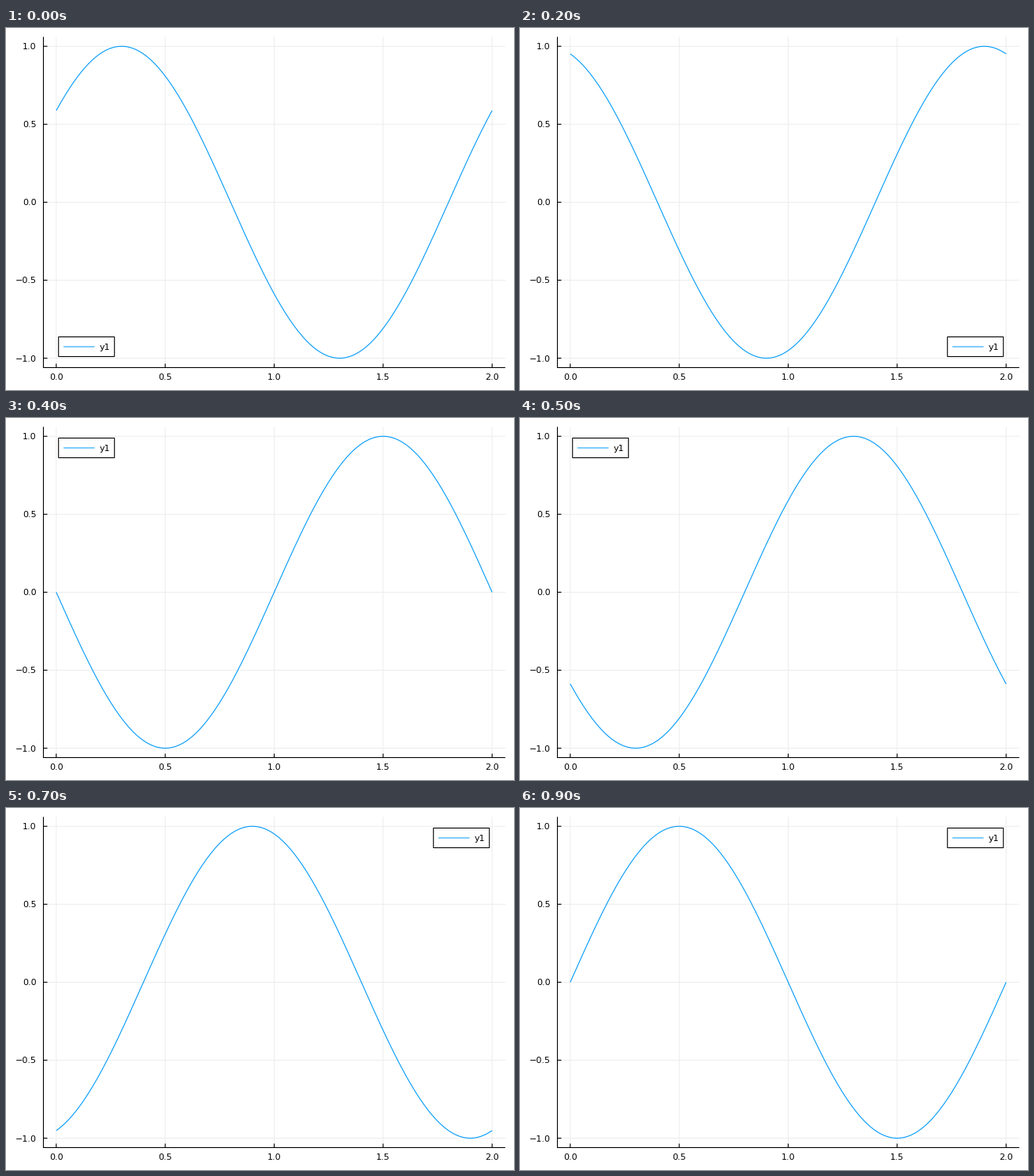
Write a matplotlib script that moves like this. It is 645 px wide and 460 px high and loops after 1 s.

```python
import matplotlib.pyplot as plt
import numpy as np
from matplotlib.animation import FuncAnimation
from matplotlib.patches import Rectangle

WIDTH, HEIGHT, DPI = 645, 460, 100
FRAMES, INTERVAL = 10, 100
PX = 72 / DPI  # one pixel in points
BLUE = "#009af9"
LEFT, RIGHT, TOP, BOTTOM = 47.5, 634, 11.3, 431.5

plt.rcParams["font.family"] = "DejaVu Sans"
plt.rcParams["font.size"] = 8

# The small margin keeps the pixel size from being rounded down.
fig = plt.figure(figsize=((WIDTH + 0.01) / DPI, (HEIGHT + 0.01) / DPI),
                 dpi=DPI, facecolor="white")
ax = fig.add_axes([0, 0, 1, 1])
ax.set(xlim=(0, WIDTH), ylim=(HEIGHT, 0))
ax.axis("off")


def to_x(value):
    return 63.8 + 276.7 * value


def to_y(value):
    return 221.4 - 198.15 * value


def stroke(x, y, color="black", width=1.0, z=2):
    return ax.plot(x, y, color=color, lw=width * PX, zorder=z, snap=False,
                   solid_capstyle="butt", solid_joinstyle="round")[0]


def number(value):
    return f"{value:.1f}".replace("-", "\u2212")


for value in np.linspace(0, 2, 5):
    x = to_x(value)
    stroke([x, x], [TOP, BOTTOM], "#ededed", z=1)
    stroke([x, x], [BOTTOM, BOTTOM - 5], width=1.1)
    ax.text(x, 447, number(value), ha="center", va="baseline")

for value in np.linspace(-1, 1, 5):
    y = to_y(value)
    stroke([LEFT, RIGHT], [y, y], "#ededed", z=1)
    stroke([LEFT, LEFT + 5], [y, y], width=1.1)
    ax.text(38.4, y + 4, number(value), ha="right", va="baseline")

stroke([LEFT, LEFT], [TOP, BOTTOM + 0.5], width=1.1)
stroke([LEFT - 0.5, RIGHT], [BOTTOM, BOTTOM], width=1.1)

t = np.linspace(0, 2, 201)
curve = stroke(to_x(t), to_y(np.sin(np.pi * t)), BLUE, 1.1, z=3)

box = Rectangle((0, 0), 71, 25, fc="white", ec="black", lw=1.1 * PX,
                zorder=4, snap=False)
ax.add_patch(box)
key = stroke([0, 0], [0, 0], BLUE, z=5)
label = ax.text(0, 0, "y1", va="baseline", zorder=5)


def legend_corner(y):
    """Return (right, top) of the preferred corner free of the curve."""
    for right, top in ((1, 1), (0, 1), (1, 0), (0, 0)):
        near_x = t > 1.53 if right else t < 0.47
        near_y = y > 0.53 if top else y < -0.53
        if not np.any(near_x & near_y):
            return right, top
    return 1, 1


def update(frame):
    y = np.sin(np.pi * (t + 0.2 * (frame + 1)))
    curve.set_ydata(to_y(y))
    right, top = legend_corner(y)
    x0 = 543 if right else 67
    y0 = 25.5 if top else 392.5
    box.set_xy((x0 - 0.3, y0))
    key.set_data([x0 + 6, x0 + 45.5], [y0 + 12.5, y0 + 12.5])
    label.set_position((x0 + 51.5, y0 + 16.5))
    return curve, box, key, label


anim = FuncAnimation(fig, update, frames=FRAMES, interval=INTERVAL,
                     repeat=True, repeat_delay=0)
plt.show()
```
